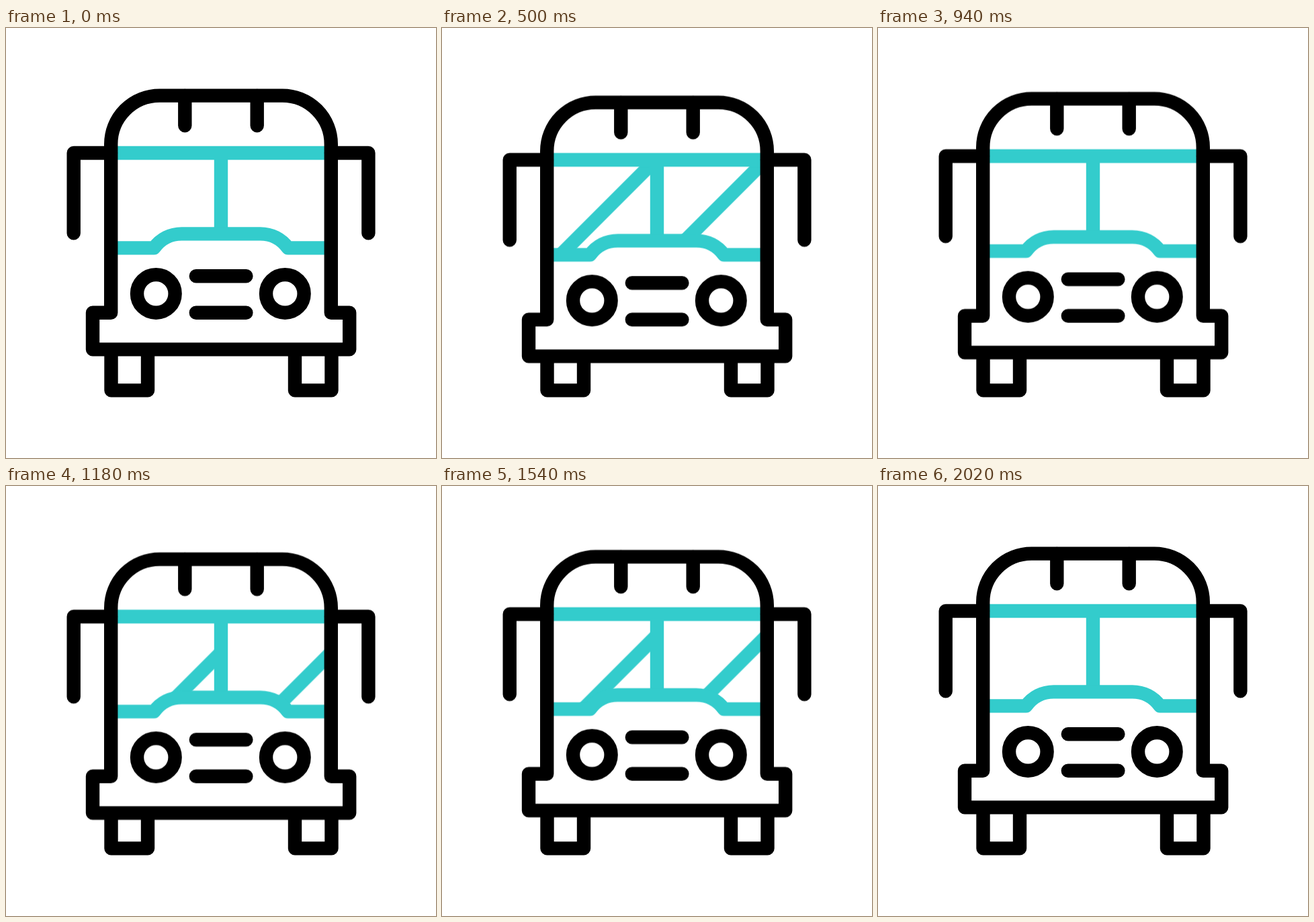
Write an HTML page that moves like this. It is 640x640 px and loops after 2400 ms.

```html
<!DOCTYPE html>
<html lang="en">
<head>
<meta charset="utf-8">
<title>Bus</title>
<style>
  html, body { margin: 0; width: 100%; height: 100%; overflow: hidden; background: #fff; }
  svg { display: block; width: 100%; height: 100%; }
  .line { fill: none; stroke: #000; stroke-width: 20.4; stroke-linecap: round; stroke-linejoin: round; }
  .teal { stroke: #3cc; }
  .flat { stroke-linecap: butt; }

  .body, .shine { animation: 2400ms cubic-bezier(.3333, 0, .6667, 1) infinite; }
  .body { animation-name: bob; }
  .shine { animation-name: sweep; }

  /* three bobs of 600 ms between 200 ms and 2000 ms */
  @keyframes bob {
    0%, 8.3333%, 33.3333%, 58.3333%, 83.3333%, 100% { transform: translateY(0); }
    20.8333%, 45.8333%, 70.8333% { transform: translateY(10.2px); }
  }
  /* across the glass, back to the middle, out again */
  @keyframes sweep {
    0%, 8.3333% { transform: translateX(335px); }
    33.3333% { transform: translateX(671px); }
    58.3333% { transform: translateX(511px); }
    83.3333%, 100% { transform: translateX(700px); }
  }
</style>
</head>
<body>
<svg viewBox="0 0 640 640">
  <defs>
    <clipPath id="pane-left">
      <path d="M156 186H320V306.4H261.5C245 306.4 230 314 220.4 327.4H156Z"/>
    </clipPath>
    <clipPath id="pane-right">
      <path d="M484 186H320V306.4H378.5C395 306.4 410 314 419.6 327.4H484Z"/>
    </clipPath>
    <path id="ray" d="M-160 160L-350 350"/>
  </defs>

  <g class="line flat">
    <path d="M156.5 484V539.4H211V484"/>
    <path d="M430 484V539.4H484.5V484"/>
  </g>

  <g class="body line">
    <g class="teal flat">
      <g clip-path="url(#pane-left)"><g class="shine"><use href="#ray"/></g></g>
      <g clip-path="url(#pane-right)"><g class="shine"><use href="#ray" x="164"/></g></g>
      <path d="M156 186H484M320 186V306"/>
      <path d="M156 327.4H220.4C230 314 245 306.4 261.5 306.4H378.5C395 306.4 410 314 419.6 327.4H484"/>
    </g>
    <path d="M129 478.4V423.8H156.2V173A72.4 72.4 0 0 1 228.6 100.6H411.4A72.4 72.4 0 0 1 483.8 173V423.8H511.2V478.4Z"/>
    <path d="M266.3 101V145.2M373.7 101V145.2"/>
    <path d="M156 186H100.7V305.4M484 186H539.4V305.4"/>
    <path d="M282.8 369.2H357.4M282.8 423.8H357.4"/>
    <circle cx="223.3" cy="395.4" r="28.3"/>
    <circle cx="415.3" cy="395.4" r="28.3"/>
  </g>
</svg>
</body>
</html>
```
